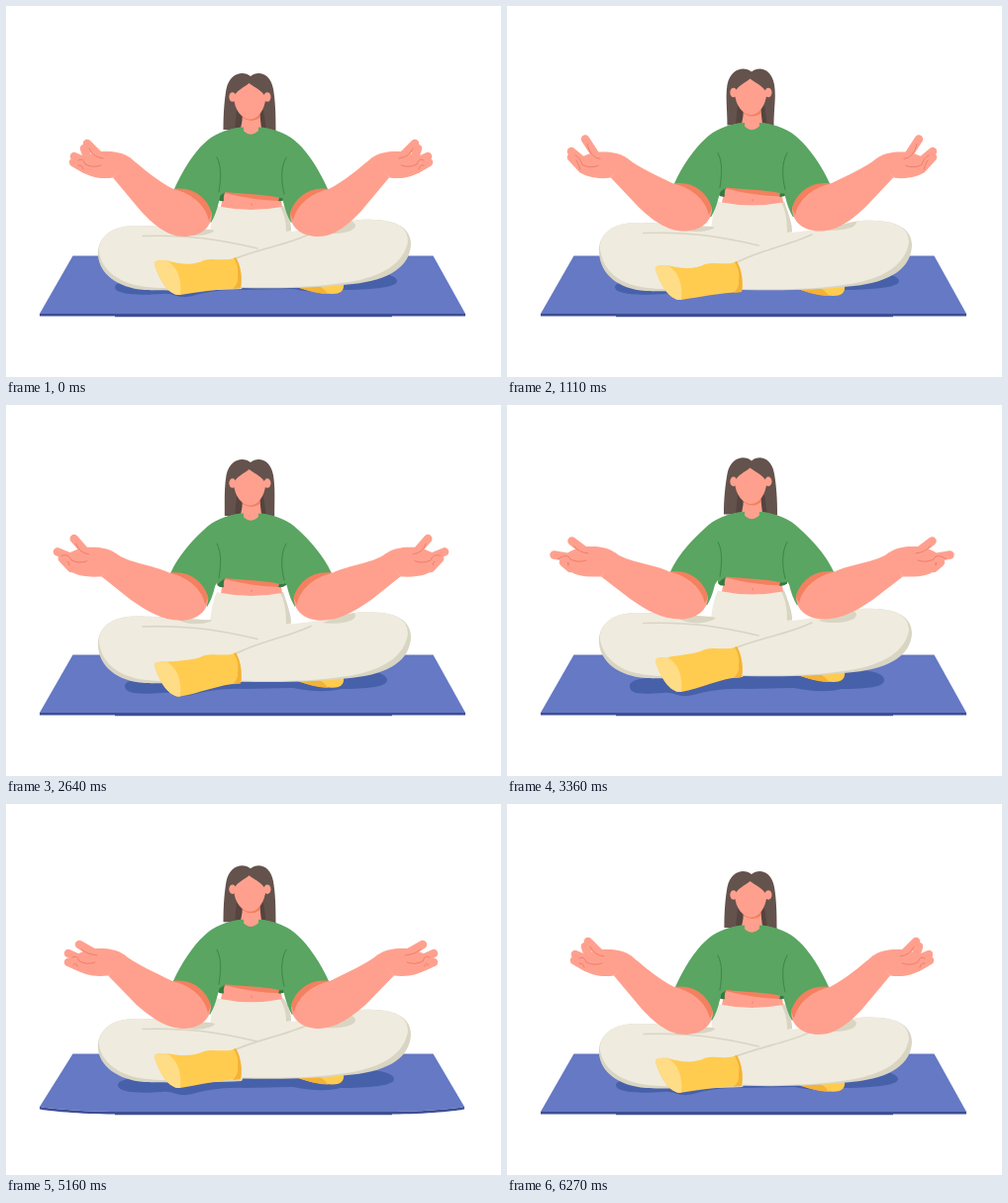
Write an HTML page that moves like this. It is 500 px wide and 375 px high and loops after 6.3 s.

```html
<!DOCTYPE html>
<html lang="en">
<head>
<meta charset="utf-8">
<title>Meditation</title>
<style>
  html, body { margin: 0; width: 100%; height: 100%; overflow: hidden; background: #fff; }
  svg { display: block; width: 100%; height: 100%; }
  .mat { fill: #6579c4; }
  .matEdge { fill: #3e4f94; }
  .shade { fill: #4760aa; }
  .pants { fill: #efebdf; }
  .pantsDark { fill: #d9d5c3; }
  .sock { fill: #ffcc4f; }
  .sockLight { fill: #ffdc86; }
  .sockDark { fill: #f4b236; }
  .skin { fill: #ffa08e; }
  .skinDark { fill: #f3805f; }
  .shirt { fill: #59a561; }
  .shirtDark { fill: #38783f; }
  .hair { fill: #64524c; }
  .hairDark { fill: #55443f; }
  .line { fill: none; stroke-width: 1; stroke-linecap: round; }
  .fold { stroke: #d9d5c3; stroke-width: 1.6; }
  .seam { stroke: #3d8647; }
  .crease { stroke: #ec7b69; stroke-width: .9; }
  .finger { fill: none; stroke: #ffa08e; stroke-width: 8.5; stroke-linecap: round; stroke-linejoin: round; }
</style>
</head>
<body>
<svg viewBox="0 0 500 375">
  <defs>
    <clipPath id="legClip"><path id="clipL"/><path id="clipR"/></clipPath>
    <g id="arm">
      <path id="sleeve" class="shirt"/>
      <path id="limb" class="skin"/>
      <path id="cuff" class="skinDark"/>
      <path id="palm" class="skin"/>
      <path id="fingers" class="finger"/>
      <path id="creases" class="line crease"/>
    </g>
  </defs>

  <path id="mat" class="mat"/>
  <path id="matEdge" class="matEdge"/>
  <path id="shadow" class="shade"/>

  <path id="backFoot" class="sock"/>
  <path id="backFootDark" class="sockDark"/>
  <path id="legLDark" class="pantsDark"/>
  <path id="legL" class="pants"/>
  <path id="legRDark" class="pantsDark"/>
  <path id="legR" class="pants"/>
  <path id="hips" class="pants"/>
  <path id="hipDark" class="pantsDark"/>
  <path id="folds" class="line fold"/>
  <g clip-path="url(#legClip)">
    <ellipse id="armShadeL" class="pantsDark" cx="192" rx="20" ry="8"/>
    <ellipse id="armShadeR" class="pantsDark" cx="330" rx="23" ry="8"/>
  </g>
  <path id="foot" class="sock"/>
  <path id="toes" class="sockLight"/>
  <path id="heel" class="sockDark"/>

  <g id="body">
    <path id="hair" class="hair"/>
    <path class="hairDark" d="M233 105L240 108L238 125H231Z M260 105L255 108L258 125H263Z"/>
    <path class="skin" d="M239 106H256L258 124Q247 139 237 124Q239 116 239 106Z"/>
    <path class="skinDark" d="M239 109Q247 116 256 107L256.500 113Q248 119 239 113Z"/>
    <ellipse class="skin" cx="228.800" cy="92" rx="3.500" ry="4.800"/>
    <ellipse class="skin" cx="264" cy="92" rx="3.500" ry="4.800"/>
    <path class="skin" d="M245.500 78C240 83 232 85 230 93C231 105 238 114.500 246.500 114.500C255 114.500 261 105 262.500 93C260 86 252 83 245.500 78Z"/>
    <path class="skin" d="M221 184H276L279 203Q247 209 217 203Z"/>
    <path class="skinDark" d="M221 185L276 188L277 197Q247 196 221 189Z"/>
    <path class="line crease" d="M248 200v1.500"/>
    <path class="shirtDark" d="M213 190L223 185Q219 191 220 197Q215 198 213 194Z M275 190L283 190L283 195Q279 198 275 197Q277 193 275 190Z"/>
  </g>

  <use href="#arm"/>
  <use href="#arm" transform="translate(495) scale(-1 1)"/>

  <g id="shirt">
    <path class="shirt" d="M237 122.500Q247 137 258 122.500C270 124 284 130 292 139.500L283 160L283 193Q279 195 275 193.500C258 190 240 190 222 188Q216 191 213 195L212 160L203 139.500C211 130 224 124 237 122.500Z"/>
    <path class="line seam" d="M213 153C218 162 217 176 215 188M283 153C277 163 278 178 281 190"/>
  </g>
</svg>

<script>
const LOOP = 6300, STEP = 30;
const TIMES = [0, 1110, 1980, 3360, 4230, 5160];

// Offsets from the resting pose at each key time.
const OFFSETS = {
  body: [0, -4.5, -10.3, -14.6, -12.3, -5.8],
  armX: [0, -1, -2, -5, -2, -1],
  armY: [0, -5.5, -12.5, -16.5, -13, -6],
  wristX: [0, -4, -11, -16, -13, -6],
  wristY: [0, .5, -2, -4, -3, -1],
  kneeL: [0, -3, -5, -12, -11.5, -5],
  baseL: [0, 1, -1, -11, -11, -6],
  kneeR: [0, 1, -3, -10, -11, -8],
  baseR: [0, 2, 0, -11, -11.5, -7.5],
  ankle: [0, 4, 2, -10, -11, -7],
  toe: [0, 5, 6, -2, -6, -5],
  inset: [0, -1, 5, 14, 10, 3],
  curl: [0, 0, 0, 0, 0, 5]
};

// Positions at each key time.
const POINTS = {
  hairW: [26.5, 23.5, 23.5, 27, 27, 26.5],
  indexX: [82, 79, 73, 65.5, 68, 74],
  indexY: [139, 134.5, 133.5, 137.5, 140.5, 142],
  thumbX: [79, 83, 76, 70, 74, 80],
  thumbY: [144, 156, 154, 154, 154, 154],
  midX: [69, 65, 58, 47.5, 54.5, 63],
  midY: [152, 147, 146, 151.5, 154.5, 151],
  lastX: [68, 65, 58, 57, 59, 63],
  lastY: [158, 153, 152, 159, 160, 160]
};
const TRACKS = { ...OFFSETS, ...POINTS };

// Smooth periodic curve through the key values.
function sample(values, t) {
  const n = TIMES.length;
  const time = i => TIMES[(i + n) % n] + Math.floor(i / n) * LOOP;
  const value = i => values[(i + n) % n];
  const slope = i => (value(i + 1) - value(i - 1)) / (time(i + 1) - time(i - 1));
  let i = n - 1;
  while (TIMES[i] > t) i--;
  const span = time(i + 1) - time(i), u = (t - time(i)) / span;
  const u2 = u * u, u3 = u2 * u;
  return value(i) * (2 * u3 - 3 * u2 + 1) + value(i + 1) * (3 * u2 - 2 * u3)
    + span * (slope(i) * (u3 - 2 * u2 + u) + slope(i + 1) * (u3 - u2));
}

const el = id => document.getElementById(id);
const draw = (id, ...parts) => el(id).setAttribute('d', parts.join(' '));

// Shifts every coordinate pair of a path piece.
const shift = (d, dx, dy) => d.replace(/(-?[\d.]+) (-?[\d.]+)/g,
  (_, x, y) => `${(+x + dx).toFixed(2)} ${(+y + dy).toFixed(2)}`);

function drawMat(p) {
  const c = Math.max(0, p.curl), y = 311 - c, x = c / 5;
  const front = (dy) => `C${40 + x} ${y + dy + c * .3} 75 ${311 + dy} 112 ${311 + dy} L387 ${311 + dy} C424 ${311 + dy} ${458 - x} ${y + dy + c * .3} ${464 - x} ${y + dy}`;
  draw('mat', `M67.500 252.500 L34 ${y}`, front(0), 'L431.500 252.500 Z');
  draw('matEdge', `M34 ${y}`, front(0), `L${464 - x} ${y + 2.5}`,
    `C${458 - x} ${y + 2.5 + c * .3} 424 313.500 390 313.500 L390 314.300 L110 314.300 L110 313.500 C75 313.500 ${40 + x} ${y + 2.5 + c * .3} 34 ${y + 2.5} Z`);
  const l = 110 + p.inset, r = 395 - p.inset;
  draw('shadow', `M${l} 284 C${l} 277 140 274 180 274 L330 267 C360 267 ${r} 269 ${r} 278`,
    `C${r} 285 365 287 338 287 C322 291 305 289 290 286 L240 287`,
    `C218 286 200 290 188 293 C174 297 168 289 158 291 C130 293 ${l} 291 ${l} 284 Z`);
}

function drawLegs(p) {
  const { kneeL, baseL, kneeR, baseR, ankle, toe, body } = p;
  const left = [
    shift('M207 226 C170 224 150 222 130 222 C104 222 92 236 93 252', 0, kneeL),
    shift('C94 270 112 285 140 287 C160 288 200 288 238 286', 0, baseL),
    shift('L262 244', 0, kneeR), 'Z'];
  const rightTop = shift('M232 256', 0, ankle);
  const right = [rightTop,
    shift('C262 243 300 234 330 223 C350 216 360 215 372 216 C400 217 409 228 409 241', 0, kneeR),
    shift('C408 263 388 277 350 281 C315 285 280 286 238 285', 0, baseR), 'Z'];
  draw('legLDark', ...left);
  draw('clipL', ...left);
  draw('legL',
    shift('M207 226 C170 224 150 222 130 222 C104 222 93 236 94 249', 0, kneeL),
    shift('C97 267 114 281 142 284 C160 286 200 286 238 284', 0, baseL),
    shift('L262 244', 0, kneeR), 'Z');
  draw('legRDark', ...right);
  draw('clipR', ...right);
  draw('legR', rightTop,
    shift('C262 243 300 234 330 223 C350 216 360 215 372 216 C398 217 406 226 406 238', 0, kneeR),
    shift('C402 260 381 273 347 279 C315 284 280 285 238 284', 0, baseR), 'Z');
  draw('hips', shift('M213 202 C235 207 262 207 280 202', 0, body),
    shift('C285 211 288 220 288 228 L335 222 L300 238 L256 246', 0, kneeR),
    shift('L206 236 L206 228', 0, kneeL), shift('Q208 212 213 202', 0, body), 'Z');
  draw('hipDark', shift('M280 202', 0, body), shift('C285 211 288 219 288 227 L283 228', 0, kneeR),
    shift('Q283 213 277 203', 0, body), 'Z');
  draw('folds', shift('M138 232.500 C185 231 215 236 254 245', 0, kneeL),
    shift('M232 255', 0, ankle), shift('C258 245 285 241 308 230', 0, kneeR));
  el('armShadeL').setAttribute('cy', 224 + p.armY * .7);
  el('armShadeR').setAttribute('cy', 222 + p.armY * .6);

  const tip = shift('M150 261 C149 257 155 257 162 257', 0, toe);
  const heelEdge = shift('C237 262 239 275 237 285', 0, ankle);
  draw('foot', tip, shift('C178 262 190 262 200 257 C212 254 222 259 232 254', 0, ankle), heelEdge,
    shift('C215 286', 0, ankle), shift('195 289 176 292 C165 293 155 278 150 261', 0, toe), 'Z');
  draw('toes', tip, shift('C172 262 178 275 176 292 C165 293 155 278 150 261', 0, toe), 'Z');
  draw('heel', shift('M232 254', 0, ankle), heelEdge,
    shift('L229 286 Q235 280 234 274 C235 267 234 261 230 255 Z', 0, ankle));
  draw('backFoot', shift('M294 284 L341 281 C342 288 337 291 330 291 C317 291 305 288 294 284 Z', 0, baseR));
  draw('backFootDark', shift('M294 284 L316 283 Q322 286 325 291 C315 291 305 288 294 284 Z', 0, baseR));
}

function drawArm(p) {
  const { armX: ax, armY: ay, wristX: wx, wristY: wy, body } = p;
  const low = `${108 + wx * .8} 173.500`;
  draw('sleeve', shift('M240 122.500 C222 124 209 130 200 139 C189 149', 0, body),
    shift('178 167 170 185 L207 219 Q212 211 215 198', ax, ay),
    shift('L218 184 L240 160', 0, body), 'Z');
  draw('limb', shift('M125 153 C137 163', wx, wy),
    shift('153 177 169 185 C190 184 204 197 208 210 C208 224 196 233 180 233 C162 233', ax, ay),
    shift('147 219', ax, ay * .65), shift('136 207', wx * .7, ay * .65), `L${low} Z`);
  draw('cuff', shift('M169 185 C190 182 204 195 208 210 L205 217 C202 203 190 190 169 185 Z', ax, ay));
  draw('palm', shift('M126 154 C118 147 106 147 97 147 C88 148 78 151 74 157', wx, wy),
    shift('C72 164 77 169 86 172 C94 174.500 102 174.500', wx, wy * .2), `${low} Z`);
  const base = `${84 + wx} ${159 + wy}`;
  draw('fingers',
    `M${p.indexX} ${p.indexY}`, shift('L94 151', wx, wy),
    `M${p.thumbX} ${p.thumbY} L${base}`,
    `M${p.midX} ${p.midY} L${base}`,
    `M${p.lastX} ${p.lastY}`, shift('L80 165', wx, 0));
  draw('creases',
    `M${p.indexX + 2} ${p.indexY + 5}`, shift('Q88 153 98 154', wx, wy),
    `M${p.midX + 4} ${p.midY + 4}`, shift('Q78 153 80 160 Q88 164 96 161', wx, wy),
    `M${p.lastX + 5} ${p.lastY + 3}`, shift('Q77 160 78 165', wx, wy));
}

function drawBody(p) {
  const w = p.hairW, move = `translate(0 ${p.body})`;
  draw('hair', `M247 71 C240 65 226 67 222.500 84 C220.500 96 ${246 - w} 108 ${246 - w} 125`,
    `L${246 + w} 126 C${246 + w} 108 272 96 270 84 C267 67 254 65 247 71 Z`);
  el('body').setAttribute('transform', move);
  el('shirt').setAttribute('transform', move);
}

function render(now) {
  const t = Math.floor(now % LOOP / STEP) * STEP;
  const pose = {};
  for (const name in TRACKS) pose[name] = sample(TRACKS[name], t);
  drawMat(pose);
  drawLegs(pose);
  drawBody(pose);
  drawArm(pose);
}

const start = performance.now();
function tick() {
  render(performance.now() - start);
  requestAnimationFrame(tick);
}
tick();
</script>
</body>
</html>
```
